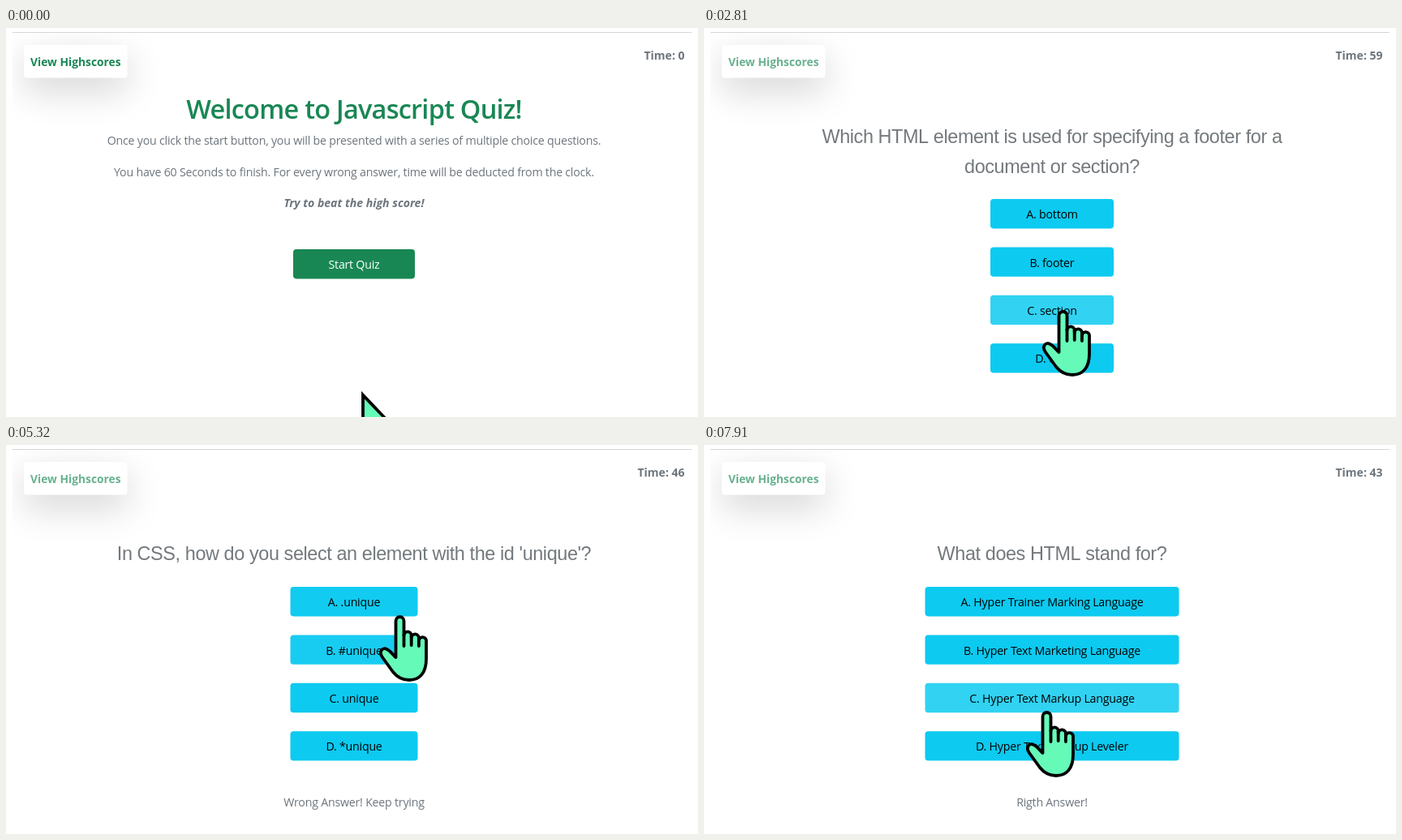
Recreate the animation shown at these times as an HTML page with a canvas. Size 853x480 px, loop 8000 ms.

```html
<!DOCTYPE html>
<html lang="en">
<head>
<meta charset="utf-8">
<title>Javascript Quiz</title>
<style>
  html, body { margin: 0; width: 100%; height: 100%; overflow: hidden; background: #fff; }
  canvas { display: block; }
</style>
</head>
<body>
<canvas id="stage" width="853" height="480"></canvas>
<script>
const ctx = document.getElementById('stage').getContext('2d');
const LOOP = 8000, MID = 429, FADE = 150;
const SANS = '"Open Sans", "Noto Sans", sans-serif';
const ARIAL = '"Liberation Sans", Arial, sans-serif';
const GREY = '#6c757d';
const GREEN = [25, 135, 84], GREEN_HOVER = [21, 115, 71];
const CYAN = [13, 202, 240], CYAN_HOVER = [49, 210, 242];

const screens = [
  { at: 0, x: 354, w: 150, top: 273, options: ['Start Quiz'] },
  { at: 1280, x: 353, w: 152, top: 211,
    ask: ['Which HTML element is used for specifying a footer for a', 'document or section?'],
    options: ['A. bottom', 'B. footer', 'C. section', 'D. end'] },
  { at: 3470, x: 350.5, w: 157, top: 175, note: 'Wrong Answer! Keep trying',
    ask: ["In CSS, how do you select an element with the id 'unique'?"],
    options: ['A. .unique', 'B. #unique', 'C. unique', 'D. *unique'] },
  { at: 5920, x: 291, w: 276, top: 175, note: 'Rigth Answer!',
    ask: ['How can you add a comment in a CSS file?'],
    options: ['A. // This is a comment', 'B. /* This is a comment */',
              'C. - This is a comment', 'D. <!-- This is a comment -->'] },
  { at: 7250, x: 272.5, w: 313, top: 175, note: 'Rigth Answer!',
    ask: ['What does HTML stand for?'],
    options: ['A. Hyper Trainer Marking Language', 'B. Hyper Text Marketing Language',
              'C. Hyper Text Markup Language', 'D. Hyper Text Markup Leveler'] }
];

// [time, clock reading]
const ticks = [[0, 0], [1960, 60], [2810, 59], [3640, 58], [4470, 47],
               [5300, 46], [6140, 45], [6980, 44], [7820, 43]];

// [time, x, y] of the pointer tip
const path = [
  [0, 439, 449], [600, 437, 341], [840, 436, 296], [1800, 436, 296],
  [1850, 434, 317], [2330, 442, 348], [4230, 442, 348], [4600, 478, 322],
  [5020, 488, 286], [5320, 485, 210], [5500, 485, 212], [5860, 486, 257],
  [6740, 486, 257], [7010, 454, 265], [7250, 454, 265], [7910, 422, 328], [8000, 422, 328]
];

const arrow = new Path2D('M2 5L40.5 45.5L23 46.5L30.5 63L21.5 67.5L13.5 50.5L2 62.5Z');
const hand = new Path2D(
  'M-4.5 52V7A5 5 0 0 1 5.5 7V25A4.6 4.6 0 0 1 14.7 25V28A4.6 4.6 0 0 1 23.9 28' +
  'V31A4.6 4.6 0 0 1 33 31V54C33 71 25 80 12 80C2 80-4 75-8 70L-21 52' +
  'C-26 45-21 39-15.5 42C-11 44-9 48-4.5 52Z');
const knuckles = new Path2D('M5.5 24V38M14.7 25V37M23.9 28V38');

const last = (list, test) => list.filter(test).pop();
const screenAt = t => last(screens, s => s.at <= t);

function pointer(t) {
  const i = Math.max(1, path.findIndex(p => p[0] >= t));
  const [t0, x0, y0] = path[i - 1], [t1, x1, y1] = path[i];
  const k = (t - t0) / (t1 - t0);
  return [x0 + (x1 - x0) * k, y0 + (y1 - y0) * k];
}

const buttonBox = (s, i) => [s.x, s.top + 59.4 * i, s.w, 36.4];

function hovered(s, t) {
  const [px, py] = pointer(t);
  return s.options.findIndex((_, i) => {
    const [x, y, w, h] = buttonBox(s, i);
    return px >= x && px <= x + w && py >= y && py <= y + h;
  });
}

// Share of the last FADE ms the pointer spent on a button
function glow(s, i, t) {
  const n = 10;
  let sum = 0;
  for (let k = 0; k < n; k++) {
    if (hovered(s, Math.max(0, t - FADE * k / n)) === i) sum++;
  }
  return sum / n;
}

const mix = (a, b, k) => `rgb(${a.map((v, i) => Math.round(v + (b[i] - v) * k))})`;

function text(str, x, y, font, color, spacing = 0, align = 'center') {
  ctx.font = font;
  ctx.fillStyle = color;
  ctx.textAlign = align;
  ctx.letterSpacing = spacing + 'px';
  ctx.fillText(str, x, y);
}

const body = (str, y, color = GREY) => text(str, MID, y, `14.2px ${SANS}`, color, -0.22);

function box(x, y, w, h, color) {
  ctx.fillStyle = color;
  ctx.beginPath();
  ctx.roundRect(x, y, w, h, 3.8);
  ctx.fill();
}

function header(t, started) {
  ctx.fillStyle = '#d6d6d6';
  ctx.fillRect(8, 5, 837, 1);
  ctx.save();
  ctx.beginPath();
  ctx.rect(8, 6, 837, 474);
  ctx.clip();
  ctx.shadowColor = 'rgba(0,0,0,.175)';
  ctx.shadowBlur = 45;
  ctx.shadowOffsetY = 15;
  box(22, 21, 127.5, 40.5, '#fff');
  ctx.restore();
  ctx.globalAlpha = started ? 0.65 : 1;
  text('View Highscores', 30, 47, `bold 13.8px ${SANS}`, mix(GREEN, GREEN, 0), 0, 'left');
  ctx.globalAlpha = 1;
  const time = last(ticks, k => k[0] <= t)[1];
  text('Time: ' + time, 836.5, 39, `bold 14px ${SANS}`, GREY, 0, 'right');
}

function welcome() {
  text('Welcome to Javascript Quiz!', MID, 112, `600 32.5px ${SANS}`, mix(GREEN, GREEN, 0), -0.76);
  body('Once you click the start button, you will be presented with a series of multiple choice questions.', 144);
  body('You have 60 Seconds to finish. For every wrong answer, time will be deducted from the clock.', 182.5);
  text('Try to beat the high score!', MID, 221, `italic bold 14.1px ${SANS}`, GREY);
}

function cursor(t, overButton) {
  const [x, y] = pointer(t);
  ctx.save();
  ctx.fillStyle = '#66fab9';
  ctx.strokeStyle = '#000';
  ctx.lineWidth = 3.8;
  if (overButton) {
    ctx.translate(x, y);
    ctx.lineJoin = ctx.lineCap = 'round';
    ctx.fill(hand);
    ctx.stroke(hand);
    ctx.stroke(knuckles);
  } else {
    ctx.translate(x - 1, y - 1);
    ctx.fill(arrow);
    ctx.stroke(arrow);
  }
  ctx.restore();
}

function draw(t) {
  const s = screenAt(t);
  ctx.fillStyle = '#fff';
  ctx.fillRect(0, 0, 853, 480);
  header(t, !!s.ask);
  if (s.ask) {
    s.ask.forEach((line, i) =>
      text(line, MID, 142 + 36.5 * i, `23.4px ${ARIAL}`, '#73797d', -0.39));
  } else {
    welcome();
  }
  s.options.forEach((label, i) => {
    const [x, y, w, h] = buttonBox(s, i), k = glow(s, i, t);
    box(x, y, w, h, s.ask ? mix(CYAN, CYAN_HOVER, k) : mix(GREEN, GREEN_HOVER, k));
    body(label, y + 24.2, s.ask ? '#000' : '#fff');
  });
  if (s.note) body(s.note, 446);
  cursor(t, hovered(s, t) >= 0);
}

const start = performance.now();
function tick() {
  draw((performance.now() - start) % LOOP);
  requestAnimationFrame(tick);
}
tick();
</script>
</body>
</html>
```
